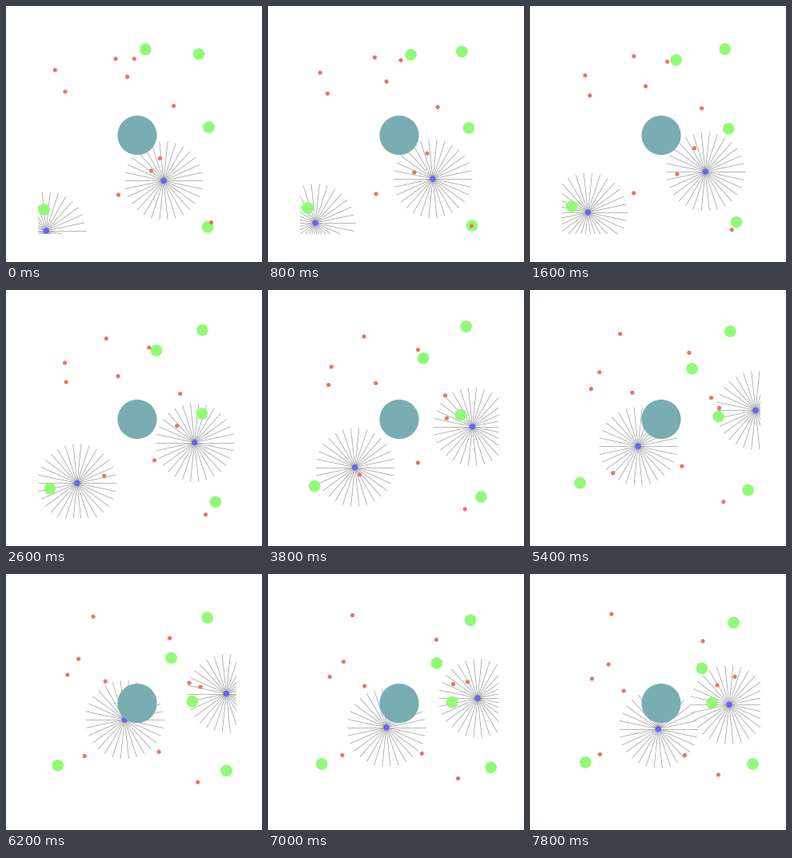
Animation, 320 px wide and 320 px high, one loop 8000 ms. Source, as a matplotlib script:

```python
import numpy as np
import matplotlib.pyplot as plt
from matplotlib.animation import FuncAnimation
from matplotlib.collections import LineCollection
from matplotlib.patches import Circle

FRAMES, STEP = 40, 200
TOP_SPEED, PUSH = 3.3, 0.42
TEAL, GREEN, RED, BLUE = "#78aeb1", "#90fb76", "#f76d63", "#6565f6"

# x, y, vx, vy and the frames where vx and vy flip (None: no bounce)
PREY = [
    (174.4, 54.4, 1.04, 1.63, None, None),
    (241.0, 60.0, 0.345, -0.76, None, 19),
    (253.5, 151.4, -0.665, 0.25, None, None),
    (252.0, 276.5, 0.76, 1.055, 37, 1),
    (47.5, 254.4, 0.56, -0.487, None, None),
]
POISON = [
    (61.3, 80.0, 0.945, 0.846, None, None),
    (74.0, 107.0, 0.09, 0.615, None, None),
    (137.0, 66.0, -0.90, -0.41, None, None),
    (160.3, 66.0, 1.43, 0.46, None, None),
    (151.6, 88.5, -0.885, 1.475, None, None),
    (209.6, 125.0, 0.628, 0.36, None, None),
    (192.5, 190.5, 1.63, -1.59, None, None),
    (181.5, 206.0, 0.31, 0.525, None, None),
    (140.5, 236.0, -1.36, -0.27, None, None),
    (256.5, 270.5, -0.54, 1.15, None, 11),
]


def bounce(p, v, flip, n):
    return p + v * (n if flip is None or n <= flip else 2 * flip - n)


def place(mover, n):
    x, y, vx, vy, fx, fy = mover
    return bounce(x, vx, fx, n), bounce(y, vy, fy, n)


def ramp(v, push, n, low=-TOP_SPEED, high=TOP_SPEED):
    return np.clip(v + push * n, low, high)


def left_speed(n):
    if n <= 31:
        return ramp(1.2, PUSH, n), ramp(-1.4, -PUSH, n)
    k = n - 31  # rebound from the obstacle
    return ramp(-2.6, 1.0, k), ramp(3.7, -0.5, k)


def right_speed(n):
    vx = ramp(1.2, PUSH, n) if n <= 28 else -TOP_SPEED
    if n <= 22:
        return vx, ramp(0.48, -PUSH, n)
    return vx, ramp(-3.36, PUSH, n - 22, high=2.0)


def track(start, speed):
    steps = [speed(n) for n in range(1, FRAMES)]
    return np.cumsum([start] + steps, axis=0)


tracks = [track((50.2, 281.0), left_speed), track((197.0, 218.4), right_speed)]

turn = np.arange(30) * 2 * np.pi / 30
spokes = np.zeros((30, 2, 2))
spokes[:, 1] = 49.3 * np.column_stack([np.cos(turn), np.sin(turn)])

fig = plt.figure(figsize=(3.2, 3.2), dpi=100, facecolor="white")
ax = fig.add_axes([0.125, 0.11, 0.775, 0.77])
ax.set_xlim(40, 288)
ax.set_ylim(284.8, 38.4)
ax.axis("off")


def disc(r, color, z, xy=(0, 0)):
    return ax.add_patch(Circle(xy, r, fc=color, ec="none", lw=0, zorder=z))


rays = [ax.add_collection(LineCollection(spokes, colors="gray", linewidths=0.4,
                                         zorder=1)) for _ in tracks]
disc(24.6, TEAL, 3, (164, 161.6))
hunters = [disc(3.7, BLUE, 2) for _ in tracks]
prey = [disc(7.3, GREEN, 4) for _ in PREY]
poison = [disc(2.6, RED, 5) for _ in POISON]


def draw(n):
    for path, fan, dot in zip(tracks, rays, hunters):
        fan.set_segments(spokes + path[n])
        dot.center = path[n]
    for dot, mover in zip(prey + poison, PREY + POISON):
        dot.center = place(mover, n)
    return rays + hunters + prey + poison


anim = FuncAnimation(fig, draw, frames=FRAMES, interval=STEP, repeat=True,
                     repeat_delay=0, blit=False)
plt.show()
```
